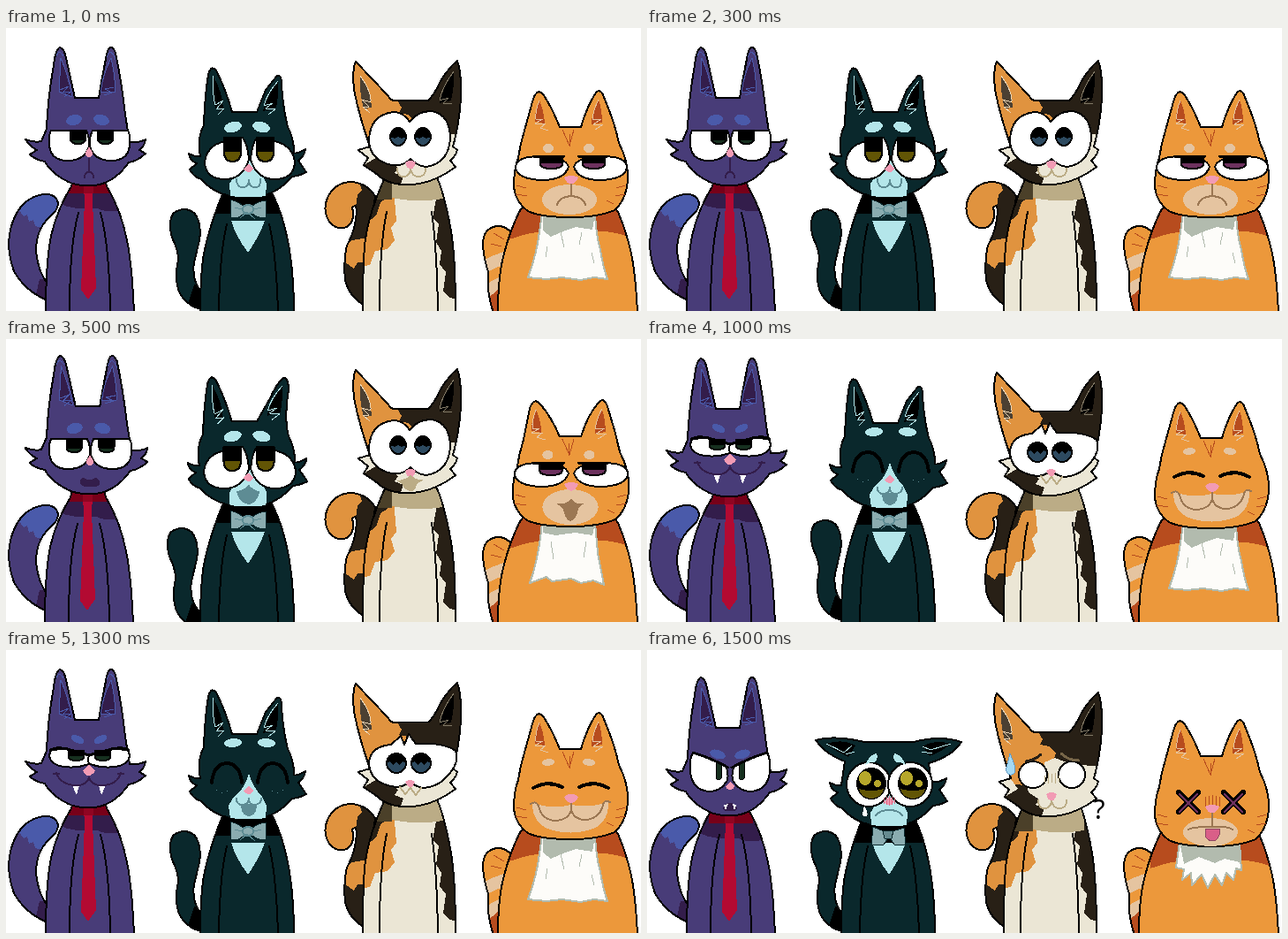
An HTML page that plays this animation: 719 by 320 pixels, repeating every 2 s.

```html
<!DOCTYPE html>
<html>
<head>
<meta charset="utf-8">
<style>
html, body { margin: 0; width: 100%; height: 100%; overflow: hidden; background: #fff }
svg { display: block; shape-rendering: crispEdges; stroke-linejoin: round; stroke-linecap: round }
</style>
</head>
<body>
<svg id="stage" width="719" height="320" viewBox="0 0 719 320"></svg>
<script>
const BLACK = '#000', WHITE = '#fff', PINK = '#f29bb4';
let clipCount = 0;

const path = (d, fill = 'none', line = 'none', w = 2) =>
  `<path d="${d}" fill="${fill}" stroke="${line}" stroke-width="${w}"/>`;
const stroke = (d, color = BLACK, w = 2) => path(d, 'none', color, w);
const oval = (x, y, rx, ry, fill, line = 'none', turn = 0) =>
  `<ellipse cx="${x}" cy="${y}" rx="${rx}" ry="${ry}" fill="${fill}" stroke="${line}" stroke-width="2" transform="rotate(${turn} ${x} ${y})"/>`;
const group = (content, dx = 0, dy = 0, sx = 1, cx = 0) =>
  `<g transform="translate(${cx + dx} ${dy}) scale(${sx} 1) translate(${-cx} 0)">${content}</g>`;
const mirror = (axis, s) => s + group(s, 2 * axis, 0, -1);

// Outlined shape whose markings stay inside it
function shape(d, fill, marks = '') {
  const id = 'clip' + clipCount++;
  return path(d, fill) + `<clipPath id="${id}"><path d="${d}"/></clipPath><g clip-path="url(#${id})">${marks}</g>` + stroke(d);
}

// Iris with a rounded bottom and a black upper part
const lidded = (x, y, w, h, dark, color) =>
  path(`M${x} ${y}h${w}v${h * .6}q0 ${h * .4} ${-w / 2} ${h * .4}t${-w / 2} ${-h * .4}z`, color, BLACK) +
  path(`M${x} ${y}h${w}v${dark}h${-w}z`, BLACK);

// In each cat, "drop" lowers the head together with its shadow on the neck
function purpleCat(pose) {
  const fur = '#483c78', dark = '#331d4b', blue = '#4a5aaa', red = '#b30a32', green = '#16301f';
  const drop = [0, -3, 0, 9][pose];
  const tail = shape('M47 308Q22 298 9 275Q-2 245 8 218Q18 192 42 188Q57 187 59 198Q59 206 49 214Q34 228 34 252Q36 275 47 289Z', fur,
    path('M10 200L20 213L24 211L26 219L31 217L33 224L42 226L70 205V180H20Z', blue) + path('M38 284L32 310H50V284Z', dark));
  const body = shape('M77 165L74 179Q58 205 51 235Q45 265 45 322H145Q143 270 137 240Q130 205 114 179L111 165Z', fur,
    group(path('M50 165H135V205Q115 210 104 204H84Q70 204 50 194Z', dark), 0, drop) +
    path('M88 180H99L98 195L102 294L93 307L85 296L89 195Z', red) +
    group(path('M70 165H120V187H70Z', '#780019') + path('M88 178H99V187H88Z', '#8f0522'), 0, drop)) +
    stroke('M82 209Q72 245 72 320M107 209Q117 245 118 320');
  const head = shape('M46 114Q47 82 54 42Q56 24 61 22Q66 23 68 34L78 79H105Q111 43 115 26Q119 17 124 28Q131 62 135 98L140 129Q151 130 158 126Q157 133 151 138L158 142Q148 151 139 152Q125 172 106 177Q91 180 75 176Q52 166 44 151Q33 149 27 143L35 138Q27 134 22 126Q33 130 40 128Z', fur) +
    path('M62 34Q61 55 60 72L75 78Q70 52 62 34Z', dark, blue, 1) +
    path('M119 34Q109 54 107 73L124 72Q123 50 119 34Z', dark, blue, 1) +
    stroke('M57 32Q60 23 65 32M114 33Q119 21 124 36M61 70L71 66L64 73L74 72L66 78M122 67L112 69L120 73L111 76', blue, 1);
  const brows = oval(77, 104, 9, 6, blue, 'none', -15) + oval(108, 104, 9, 6, blue, 'none', 15);
  const nose = path('M94 134L90 141Q90 146 94 146Q98 146 98 141Z', PINK);
  const eyes = mirror(94.5, path('M51 116H91Q95 124 94 134Q89 150 70 150Q49 150 49 130Q48 121 51 116Z', WHITE, BLACK));
  const left = pose === 1 ? 68 : 73;
  const awake = brows + eyes + lidded(left, 116, 17, 15, 11, green) + lidded(104, 116, 17, 15, 11, green) + nose;
  const frown = awake + stroke('M94 148V163M89 169Q89 163 94 163Q99 163 99 169', dark);
  const talk = awake + path('M87 160Q94 164 100 160Q105 161 105 166Q104 171 94 170Q83 171 83 165Q83 160 87 160Z', dark);
  const grin = oval(81, 101, 8, 4, blue, 'none', 25) + oval(107, 101, 8, 4, blue, 'none', -25) +
    mirror(94.5, path('M51 113Q55 109 66 111L94 119Q99 124 94 129Q80 134 66 132Q50 130 49 119Z', WHITE, BLACK)) +
    lidded(71, 114, 17, 11, 6, green) + lidded(101, 114, 17, 11, 6, green) +
    stroke('M50 113L66 111L94 119L123 111L139 113', BLACK, 3) +
    path('M94 130L87 136Q89 142 94 142Q99 141 101 136Z', PINK) +
    mirror(94, path('M75 153L80 164L83 153Z', WHITE)) +
    stroke('M57 139Q62 153 80 153Q92 153 94 144Q96 153 108 153Q126 153 130 139M54 140H60M127 140H133', dark);
  const angry = mirror(94, oval(80, 109, 9, 5, blue, 'none', 18) +
    path('M52 107Q70 113 88 121Q93 128 91 138Q84 151 70 151Q50 149 49 127Q48 114 52 107Z', WHITE, BLACK) +
    path('M78 118L84 121V136Q81 140 78 136Z', green, BLACK, 1) + stroke('M52 107Q72 113 92 124', BLACK, 3)) +
    path('M94 140L89 145Q90 149 94 149Q98 149 99 145Z', PINK) +
    path('M86 171Q87 164 94 164Q101 164 102 171L99 173H89Z', dark) + path('M87 166L89 172L92 165ZM97 165L99 173L101 166Z', WHITE);
  return tail + group(body, pose === 1 ? -1 : 0) +
    group(head + [frown, talk, grin, angry][pose], pose === 1 ? 1 : 0, drop, pose === 1 ? 1.02 : 1, 92);
}

function tealCat(pose) {
  const fur = '#0a282c', pale = '#b4e6ea', gray = '#8aacb0', line = '#5e8c94', olive = '#625505';
  const drop = [0, -2, 0, 8][pose];
  const tail = shape('M221 318Q203 314 195 296Q191 280 195 262Q195 251 188 237Q183 218 190 209Q202 201 213 209Q222 220 219 240L213 265Q210 285 221 298Z', fur,
    path('M213 290L204 318H224V290Z', BLACK));
  const bow = pose === 3
    ? path('M256 200L268 205L278 205L291 201L293 220H280L274 211L268 220H254Z', gray, fur, 1) + path('M267 204H279L277 213H269Z', '#668b90', fur, 1)
    : path('M255 194Q263 197 269 201H279Q286 196 294 195V214Q286 216 279 210H269Q262 217 254 214Z', gray, fur, 1) + oval(274, 205, 6, 5, gray, line) +
      stroke('M259 203L267 205M289 203L281 205M265 215L273 208L282 216', line, 1);
  const body = shape('M252 174L245 188Q230 225 224 255Q220 280 220 322H326Q326 275 319 240Q313 210 302 188L296 174Z', fur,
    group(path('M235 170H315V210H235Z', BLACK), 0, drop) + path('M255 218H293Q287 235 274 254Q260 235 255 218Z', pale)) +
    stroke('M250 222Q242 255 241 320M298 222Q306 255 308 320') + bow;
  const cheeks = 'Q328 143 339 137Q338 145 331 150L340 163Q333 167 324 168Q311 184 291 190Q274 193 253 190Q233 185 221 171Q212 168 208 160L216 153Q208 150 207 142Q214 146 220 145';
  // The right ear stands up higher while talking
  const ear = pose === 1 ? 'L298 70Q306 52 313 46Q319 45 319 60' : 'L294 70L306 55Q312 50 312 65';
  const head = pose === 3
    ? shape('M191 94Q212 88 246 96H302Q332 88 356 96Q346 112 319 120L322 141' + cheeks + 'L224 118Q202 110 191 94Z', fur) +
      path('M203 98Q222 92 236 100L228 113Q216 108 203 98Z', BLACK) + path('M344 98Q326 93 312 101L320 112Q334 107 344 98Z', BLACK) +
      stroke('M203 98Q214 103 223 108L232 100M344 98L321 105L312 101M225 110L235 107M323 109L311 107', pale, 1)
    : shape('M224 110Q225 78 229 53Q232 41 238 48Q249 70 256 95H284' + ear + 'Q314 92 319 112Q326 124 326 141' + cheeks + 'Q216 125 224 110Z', fur) +
      path('M234 54Q234 77 237 91L246 94Q246 73 234 54Z', BLACK) +
      group(path('M308 60Q295 75 291 94L306 90Q309 75 308 60Z', BLACK) +
        stroke('M308 60Q295 75 292 88L302 85L294 91L305 92L297 98', pale, 1), pose === 1 ? 4 : 0, pose === 1 ? -5 : 0) +
      stroke('M234 54Q234 77 237 87L246 82L238 92L247 91L240 98', pale, 1);
  const muzzle = path('M275 148L260 165L253 176L254 190Q275 193 294 190L295 176L290 165Z', pale);
  const nose = path('M275 153L269 159Q272 163 275 163Q278 163 280 159Z', PINK);
  const w = stroke('M261 171Q261 180 268 180Q275 180 275 172Q275 180 282 180Q289 180 288 171', line);
  const sad = muzzle + mirror(276, path('M225 153Q225 140 237 132Q252 125 268 124Q274 132 275 149Q268 171 248 171Q227 171 225 153Z', WHITE, BLACK)) +
    lidded(247, 124, 19, 27, 16, olive) + lidded(284, 124, 19, 27, 16, olive) + nose +
    oval(257, 112, 10, 6, pale, 'none', -15) + oval(289, 112, 10, 6, pale, 'none', 15);
  const talk = sad + path('M261 174Q268 174 275 167Q281 174 287 174Q284 188 274 189Q264 187 261 174Z', line);
  const happy = path('M275 140Q270 158 258 166L252 176L254 190Q275 193 294 190L295 176L290 166Q280 156 275 140Z', pale) +
    mirror(276, stroke('M233 150Q235 129 250 128Q265 129 267 150', BLACK, 4) + oval(257, 105, 10, 5, pale, 'none', -5) + stroke('M238 158h1m5 3h1m5-2h1', line, 1)) +
    nose + path('M266 174H284Q284 187 275 188Q266 187 266 174Z', line) + stroke('M261 168Q261 175 268 175Q275 174 275 168Q275 175 282 175Q289 174 289 168', line);
  const glossy = oval(251, 144, 25, 25, WHITE, BLACK) + oval(254, 143, 17, 18, BLACK) +
    path('M240 149Q254 153 268 149Q266 159 254 160Q242 159 240 149Z', olive) +
    oval(247, 137, 7, 8, '#b6a72b') + oval(261, 143, 4, 4, '#b6a72b');
  const pleading = muzzle + glossy + group(glossy, 47) +
    mirror(270, path('M247 122Q252 110 260 109Q262 115 258 119Q252 118 247 122Z', pale)) +
    path('M246 168Q251 176 249 180Q245 182 244 177Z', WHITE) + path('M274 158L268 164Q274 171 280 164Z', PINK) +
    stroke('M268 159V166M271 158V167M274 157V168M277 158V167M280 159V166', '#d96a83', 1) + stroke('M259 179Q264 173 274 173Q285 173 289 179', line);
  return group(tail, pose === 1 ? -3 : 0, pose === 1 ? 9 : 0) + body +
    group(head + [sad + w, talk, happy, pleading][pose], 0, drop, pose === 1 ? 1.02 : 1, 274);
}

function calicoCat(pose) {
  const cream = '#ebe6d5', orange = '#e0933f', dark = '#282016', tan = '#bbac86', blue = '#2d4a60';
  const drop = [0, -3, 0, 11][pose];
  const tail = shape('M406 314Q388 303 384 285Q382 262 386 246Q396 228 397 207Q396 198 392 203Q396 218 386 225Q374 229 366 219Q358 206 364 192Q372 175 390 174Q409 175 418 190L412 240L406 270Z', dark,
    path('M355 170H399L403 184L398 188L396 203L392 230L355 235Z', orange) + path('M380 248L392 240L410 237V264L398 265L394 272L380 262Z', orange));
  const body = shape('M431 165L426 176Q412 207 407 238Q404 260 404 322H509Q509 260 504 230Q499 200 491 176L486 165Z', cream,
    path('M400 165H440V194L442 218L436 226L440 240L432 250L418 252L412 268L400 270Z', orange) +
    path('M400 165H438L432 192L424 197L420 210L414 216L400 220Z', dark) +
    path('M515 188H488L483 215L490 222L487 242L493 252L491 267L498 276L495 298L502 305L515 307Z', dark) +
    group(path('M415 160H437V194H415Z', '#4b4029') + path('M437 160H495V193Q465 198 437 192Z', tan), 0, drop)) +
    stroke('M431 208Q423 245 423 320M482 208Q488 250 489 320');
  const ears = path('M401 54Q400 74 405 91L414 90Q414 72 401 54Z', '#4b4032') + path('M507 49Q494 68 491 85L504 82Q508 64 507 49Z', BLACK) +
    stroke('M401 54Q414 72 413 84L403 81L411 89L404 89L412 96', '#ead5b5', 1) + stroke('M507 49Q493 68 491 82L501 79L495 85L505 86', '#817966', 1);
  const head = shape('M396 38L432 76Q437 84 443 82H478Q486 74 492 60Q502 44 511 37Q516 50 515 80Q513 110 506 134L511 138Q509 145 503 150L509 157Q497 166 487 170Q470 178 450 177Q430 176 421 166L405 155L410 147L399 138L412 134Q400 100 394 70Q392 45 396 38Z', dark,
    path('M390 30L442 80L448 90L445 96L456 98L463 106L458 120L450 145L412 140L390 110Z', orange) +
    path('M396 134L412 135L420 146L402 157Z', cream) +
    path('M450 116L462 111L480 118L515 121V165L480 180H446L450 168L440 164L444 158L432 150L430 140L446 138Z', cream)) + ears;
  const nose = path('M452 152Q457 148 464 152Q462 159 458 160Q454 159 452 152Z', PINK);
  const pupil = (x, y) => oval(x, y, 9, 10, blue, BLACK) + path(`M${x - 9} ${y}a9 10 0 0 1 18 0l-5 2l-4-2l-4 2z`, BLACK);
  const open = path('M411 127Q412 98 439 95Q450 95 457 106Q466 94 482 94Q503 98 503 125Q501 153 476 157Q465 156 458 148Q449 157 437 155Q412 150 411 127Z', WHITE, BLACK) +
    pupil(444, 123) + pupil(472, 123) + nose;
  const w = stroke('M443 159Q443 168 450 168Q457 168 458 160Q460 168 467 168Q475 168 475 159', tan);
  const talk = open + path('M442 163Q451 163 458 157Q465 163 473 162L465 167Q464 176 457 175Q450 173 449 167Z', tan);
  const sly = path('M444 82L455 94V102L464 95L468 107L510 110V95L480 82Z', dark) +
    path('M411 128Q412 109 436 107L447 97L451 107L456 95L464 106Q495 104 509 114Q514 128 500 142Q490 155 471 156Q461 153 457 148Q450 157 436 154Q412 149 411 128Z', WHITE, BLACK) +
    [442, 470].map(x => oval(x, 128, 11, 11, blue, BLACK) + path(`M${x - 11} 128Q${x - 10} 117 ${x} 117Q${x + 10} 117 ${x + 11} 128l-4-2l-3 4l-4-3l-4 3l-3-4z`, BLACK)).join('') +
    path('M452 149Q457 145 463 149Q461 155 458 156Q454 154 452 149Z', PINK) + stroke('M446 155L452 163L458 156L464 164L470 156', tan);
  const confused = oval(437, 130, 16, 15, WHITE, BLACK) + oval(481, 130, 15, 15, WHITE, BLACK) +
    stroke('M429 115Q440 113 446 107', dark, 3) + stroke('M469 106Q477 114 489 114', '#766548', 3) +
    stroke('M450 131V139M454 128V140M458 129V139M462 128V140M466 131V138', tan, 1) + nose + w +
    path('M411 106Q417 119 417 125Q416 131 411 130Q406 129 407 122Z', '#a5d9f3', '#649bc5', 1);
  return tail + body + group(head + [open + w, talk, sly, confused][pose], 0, drop) +
    (pose === 3 ? '<text x="512" y="191" text-anchor="middle" font-family="Noto Sans, sans-serif" font-size="30">?</text>' : '');
}

function gingerCat(pose) {
  const fur = '#ec983b', rust = '#b74c1e', cream = '#e5c4a0', line = '#9b7753', cloth = '#b2bbae', plum = '#6d315e';
  const drop = [0, -2, 0, 8][pose];
  const tail = shape('M552 322Q544 300 546 276Q538 250 541 236Q546 223 560 224Q573 227 576 241L565 270L558 322Z', fur,
    path('M538 264Q556 254 575 250V265Q556 268 542 279Z', cream) + path('M542 291Q555 282 570 278V298Q555 299 547 306Z', cream) + path('M546 305L562 292V322H546Z', rust)) +
    stroke('M552 232L564 239M549 244L561 247', rust, 1);
  const napkin = [
    path('M607 210H667Q668 234 673 251Q676 270 681 284L666 282L650 285L630 282L612 284L591 282Q600 258 603 237Z', '#fdfcf9', cloth) +
      path('M608 210H667L664 228L645 225L633 229L617 236L608 229Z', cloth) + stroke('M613 247L611 259M628 231L632 248M652 231L649 245M663 254L666 266', cloth, 1),
    path('M607 208H667L670 242L677 278L665 273L651 276L640 271L618 274L612 269L593 276Q603 249 607 208Z', '#fdfcf9', cloth) +
      path('M608 208H667L664 222L645 219L622 222L608 219Z', cloth) + stroke('M617 229L620 249M657 229L654 247', cloth, 1)
  ];
  const torn = path('M603 218H671L673 249L667 247L664 260L656 252L651 266L643 254L635 269L628 254L617 266L616 252L606 260L608 248L599 246Z', '#fdfcf9', cloth) +
    path('M603 216H671V240L654 236L643 241L625 234L608 242Z', cloth);
  const body = shape('M590 195L581 208Q567 238 561 268Q557 290 557 322H715Q713 280 708 255Q702 229 693 208L684 195Z', fur,
    group(path('M570 195H705V236Q685 229 668 230H610Q592 231 570 239Z', rust), 0, drop)) + (pose === 3 ? torn : napkin[pose === 1 ? 1 : 0]);
  // Ears lean further apart while talking
  const lean = pose === 1 ? 3 : 0;
  const head = shape(`M580 147Q582 132 587 116L${597 - lean} 80Q${602 - lean} 67 ${609 - lean} 76Q619 92 627 112H651Q658 88 ${668 + lean} 73Q${674 + lean} 67 ${678 + lean} 81Q689 106 694 130Q705 151 704 172Q702 195 689 206Q671 214 640 214Q605 214 591 207Q576 196 575 178Q575 160 580 147Z`, fur) +
    group(path('M604 82Q598 94 599 106L610 108Q609 93 604 82Z', rust) +
      stroke('M604 82Q599 94 600 103L608 103L599 108L611 108L605 113L614 116', cream, 1), -lean) +
    group(path('M671 81Q663 95 663 109L675 107Q675 92 671 81Z', rust) +
      stroke('M671 81Q664 95 664 104L674 103L665 109L676 109L667 115', cream, 1), lean) +
    stroke('M630 115L638 133M638 120V134M643 115L638 133M578 178L589 181M577 188L590 190M701 178L691 181M701 188L690 190M680 195L688 199', rust, 1);
  const brows = mirror(637, oval(614, 136, 6, 5, cream));
  const nose = path('M632 169Q640 165 648 169Q645 176 640 177Q635 176 632 169Z', PINK);
  const eyes = brows +
    mirror(640, path('M577 158Q577 145 605 145Q633 145 637 157Q632 172 607 172Q579 171 577 158Z', WHITE, BLACK)) +
    lidded(605, 145, 25, 14, 8, plum) + lidded(653, 145, 25, 14, 8, plum) + stroke('M597 145H632M648 145H681', BLACK, 3) + nose;
  const bored = oval(638, 194, 31, 17, cream) + eyes + stroke('M640 177V190M624 200Q626 191 640 190Q654 191 656 200', line);
  const talk = oval(639, 192, 31, 20, cream) + group(eyes, 0, -3) +
    path('M624 188Q633 190 640 183Q646 190 654 188L648 193Q646 207 639 208Q633 206 631 194Z', line);
  const smile = mirror(637, oval(614, 127, 7, 4, cream, 'none', -8)) +
    mirror(639.5, stroke('M597 156Q613 147 630 155', BLACK, 4)) +
    path('M596 172Q615 181 640 175Q666 179 682 171Q683 194 665 202Q640 211 613 202Q595 193 596 172Z', cream) +
    stroke('M594 174Q600 170 603 176Q606 192 622 193Q637 192 640 181Q644 193 658 192Q673 189 676 175Q677 169 684 172M640 174V184', line) +
    path('M632 166Q640 159 648 166Q645 173 639 173Q634 172 632 166Z', PINK);
  const cross = x => stroke(`M${x - 11} 153l22 22m0-22l-22 22`, BLACK, 6) + stroke(`M${x - 10} 155l20 20m0-20l-20 20`, plum, 2);
  const knocked = oval(638, 198, 31, 16, cream) + cross(613) + cross(664) +
    stroke('M632 158V169M636 157V169M640 156V169M644 157V169M648 158V169', rust, 1) + nose +
    path('M632 194H648V201Q646 208 640 208Q633 207 632 201Z', '#d95f88', '#8d4761', 1) + stroke('M613 195Q618 192 638 192Q658 191 663 195M640 177V191', line);
  return tail + body + group(head + [bored, talk, smile, knocked][pose], 0, drop, pose === 1 ? 1.02 : 1, 640);
}

const cats = [purpleCat, tealCat, calicoCat, gingerCat];
stage.innerHTML = [0, 1, 2, 3].map(pose => `<g>${cats.map(cat => cat(pose)).join('')}</g>`).join('');
const poses = [...stage.children];

function tick() {
  const current = Math.floor(performance.now() / 500) % 4;
  poses.forEach((g, i) => g.style.visibility = i === current ? 'visible' : 'hidden');
  requestAnimationFrame(tick);
}
tick();
</script>
</body>
</html>
```
